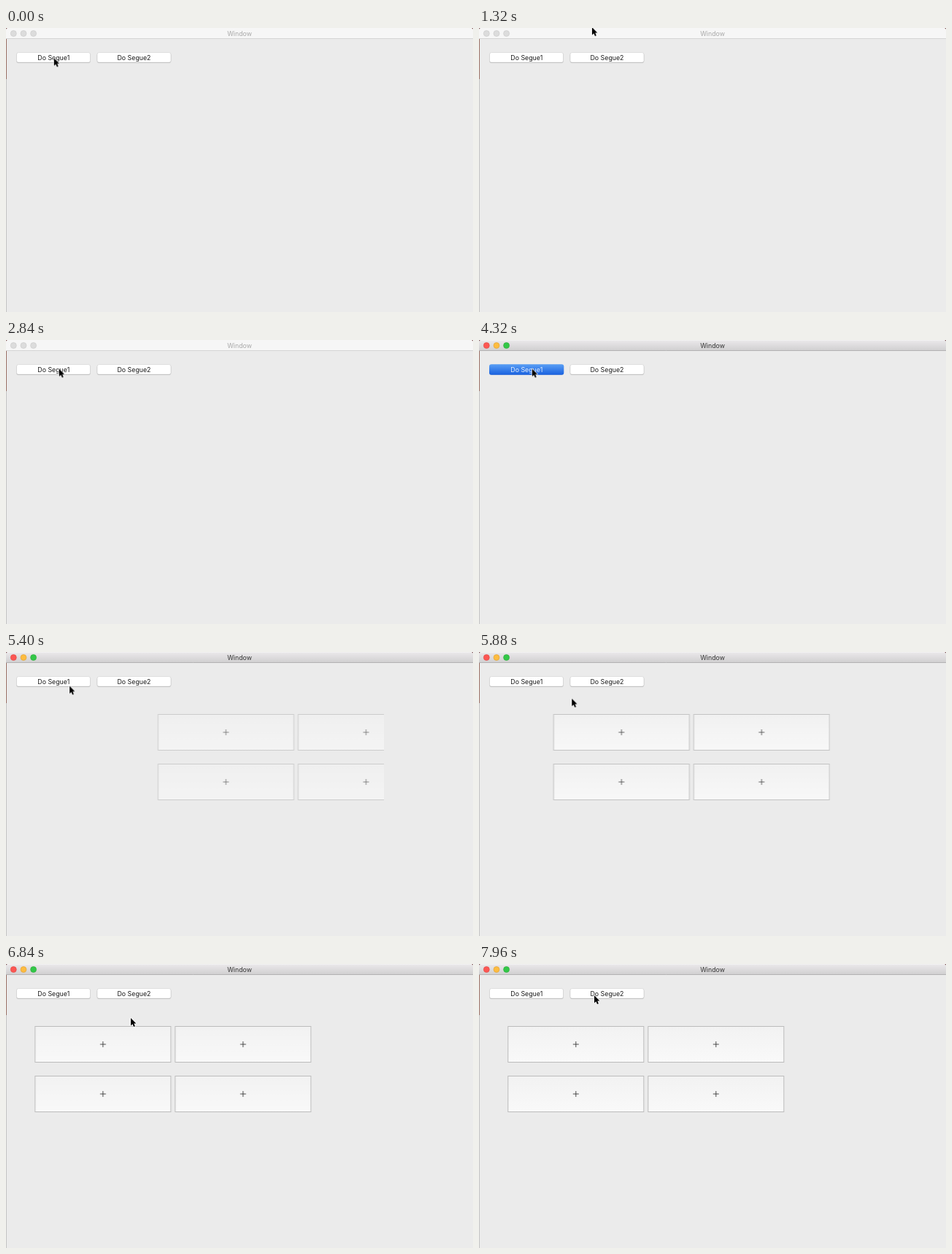
Recreate the animation shown at these times as an HTML page. Size 640 by 389 pixels, loop 8000 ms.

```html
<!DOCTYPE html>
<html lang="en">
<head>
<meta charset="utf-8">
<title>Window</title>
<style>
  html, body { margin: 0; height: 100%; overflow: hidden; background: #ebebeb; }
  svg { display: block; width: 100vw; height: 100vh; }
  text { font: 8.8px Inter, "Open Sans", sans-serif; text-anchor: middle; fill: #1c1c1c; }

  .active, .pressed, .panel, .cursor { animation: 8s linear infinite; }
  .active, .pressed { animation-timing-function: step-end; }

  /* the first click focuses the window, the second presses the button */
  .active { animation-name: focus; }
  @keyframes focus { 0% { opacity: 0 } 43%, 100% { opacity: 1 } }

  .pressed { animation-name: press; }
  @keyframes press { 0% { opacity: 0 } 52.5% { opacity: 1 } 55.5%, 100% { opacity: 0 } }

  .panel { animation-name: slide; }
  @keyframes slide {
    0%, 56.3% {
      transform: translateX(478px); opacity: 0;
      animation-timing-function: cubic-bezier(.25, .1, .25, 1);
    }
    86.1%, 100% { transform: none; opacity: 1; }
  }

  .cursor { animation-name: wander; }
  @keyframes wander {
    0%, 8.5% { transform: translate(65.8px, 41.3px); animation-timing-function: ease-in-out; }
    16.5% { transform: translate(155px, -1px); }
    18.5% { transform: translate(140px, 9.5px); }
    29% { transform: translate(78px, 30px); animation-timing-function: ease-out; }
    35.5%, 58% { transform: translate(72.8px, 39.5px); animation-timing-function: ease-in; }
    67.5% { transform: translate(87px, 46.5px); }
    79.5% { transform: translate(167.3px, 81px); animation-timing-function: ease-out; }
    85%, 95% { transform: translate(171px, 74px); animation-timing-function: ease-in-out; }
    99.5%, 100% { transform: translate(158px, 43px); }
  }
</style>
</head>
<body>
<svg viewBox="0 0 640 389" preserveAspectRatio="none">
  <defs>
    <linearGradient id="bar" x2="0" y2="1">
      <stop stop-color="#ebe9eb"/><stop offset="1" stop-color="#d1d0d1"/>
    </linearGradient>
    <linearGradient id="blue" x2="0" y2="1">
      <stop stop-color="#5a9ff5"/><stop offset="1" stop-color="#1961df"/>
    </linearGradient>
    <linearGradient id="cell" x2="0" y2="1">
      <stop stop-color="#f2f2f2"/><stop offset="1" stop-color="#f9f9f9"/>
    </linearGradient>
    <clipPath id="area"><rect x="39" y="60" width="479" height="160"/></clipPath>
    <g id="button">
      <rect x=".2" y=".9" width="101.6" height="14" rx="3" fill="#bcbcbc"/>
      <rect x=".5" y=".5" width="101" height="13.6" rx="2.7" fill="#fff" stroke="#cfcfcf" stroke-width=".6"/>
    </g>
    <g id="item">
      <rect x=".5" y=".5" width="186" height="49" fill="url(#cell)" stroke="#bcbcbc"/>
      <path d="M89.5 25H97.5M93.5 21V29" stroke="#3c3c3c" stroke-width=".9"/>
    </g>
  </defs>

  <rect width="640" height="389" fill="#ebebeb"/>

  <rect width="640" height="14" fill="#f6f6f6"/>
  <path d="M0 14.5H640" stroke="#d4d4d4"/>
  <g fill="#dcdcdc" stroke="#c8c8c8" stroke-width=".6">
    <circle cx="10.3" cy="7.5" r="4"/><circle cx="24" cy="7.5" r="4"/><circle cx="37.6" cy="7.5" r="4"/>
  </g>
  <text x="320" y="10.7" style="fill:#a8a8a8">Window</text>

  <g class="active">
    <rect width="640" height="14" fill="url(#bar)"/>
    <path d="M0 .4H640" stroke="#f5f5f5" stroke-width=".8"/>
    <path d="M0 14.5H640" stroke="#b3b2b3"/>
    <g stroke-width=".6">
      <circle cx="10.3" cy="7.5" r="4" fill="#fc5753" stroke="#df4744"/>
      <circle cx="24" cy="7.5" r="4" fill="#fdbc40" stroke="#de9f34"/>
      <circle cx="37.6" cy="7.5" r="4" fill="#33c748" stroke="#27aa35"/>
    </g>
    <text x="320" y="10.7" style="fill:#333">Window</text>
  </g>

  <path d="M.4 15V389" stroke="#b4b4b4" stroke-width=".8"/>
  <path d="M.4 15V70" stroke="#8a5040" stroke-width=".8"/>
  <path d="M0 0H2.5Q0 0 0 2.5ZM640 0H637.5Q640 0 640 2.5Z" fill="#6b3a3a"/>

  <use href="#button" x="14" y="33"/>
  <text x="65.3" y="43.6">Do Segue1</text>
  <use href="#button" x="124.5" y="33"/>
  <text x="175.5" y="43.6">Do Segue2</text>
  <g class="pressed">
    <rect x="14" y="33.2" width="102.3" height="14.5" rx="3" fill="url(#blue)"/>
    <text x="65.3" y="43.6" style="fill:#e3edfd">Do Segue1</text>
  </g>

  <g clip-path="url(#area)">
    <g class="panel">
      <use href="#item" x="39.3" y="85"/>
      <use href="#item" x="231.3" y="85"/>
      <use href="#item" x="39.3" y="153"/>
      <use href="#item" x="231.3" y="153"/>
    </g>
  </g>

  <g class="cursor">
    <path d="M0 0V10.4L2.4 8.2L4 12L5.9 11.2L4.3 7.5H7.4Z" fill="#000" stroke="#fff" stroke-width="1.2" stroke-linejoin="round" paint-order="stroke"/>
  </g>
</svg>
</body>
</html>
```
